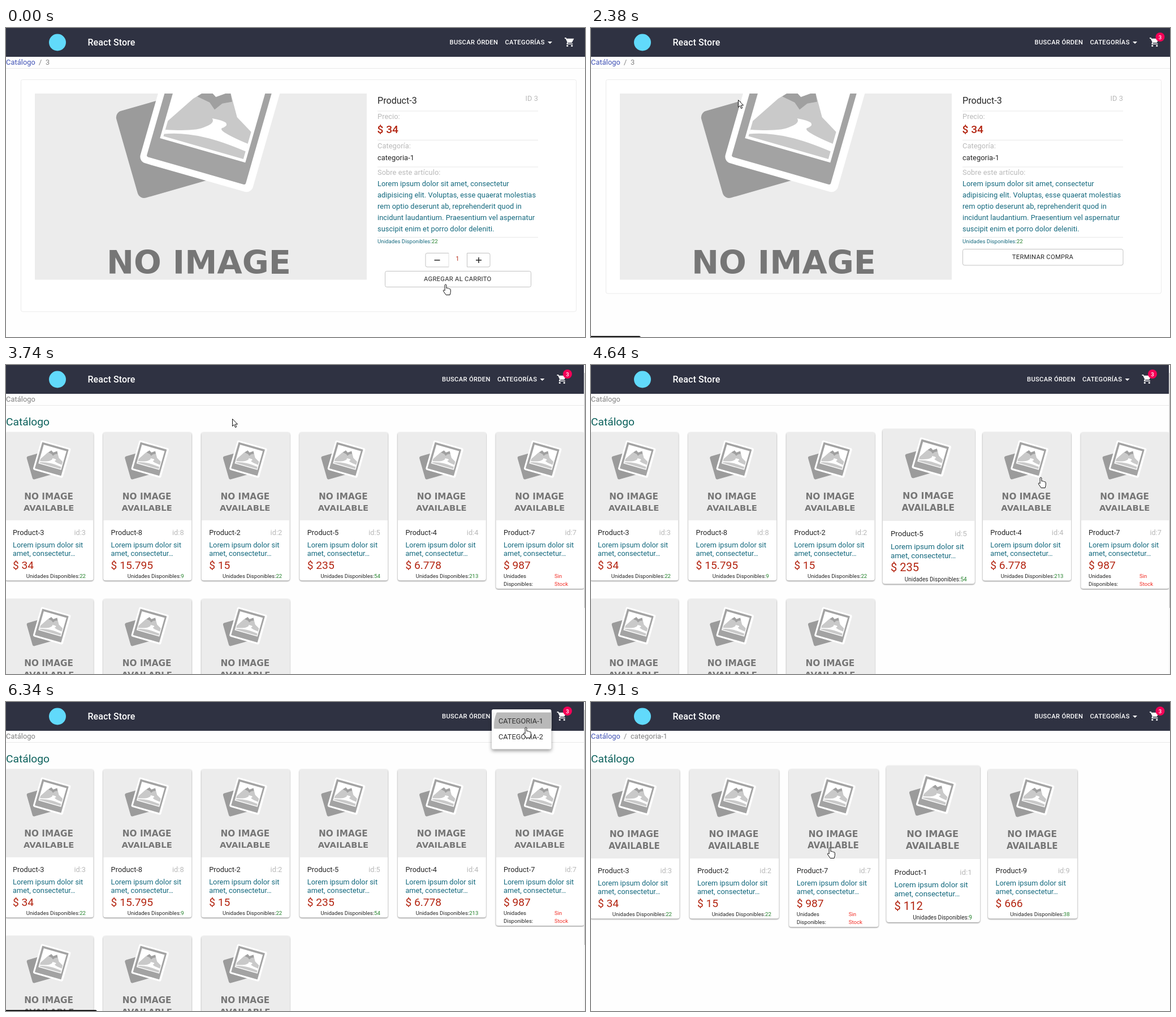
Write an HTML page that moves like this. It is 1024 px wide and 547 px high and loops after 8000 ms.

```html
<!DOCTYPE html>
<html lang="es">
<head>
<meta charset="utf-8">
<title>React Store</title>
<style>
html, body { margin: 0; width: 100%; height: 100%; overflow: hidden; background: #fefefe; }
svg { display: block; width: 1024px; height: 547px; font-family: Roboto, Arial, sans-serif; }
text { white-space: pre; }
.paper { fill: #fff; filter: drop-shadow(0 1px .8px rgba(0,0,0,.5)); }
.pop { fill: #fff; filter: drop-shadow(0 3px 3px rgba(0,0,0,.4)); }
.box { fill: none; stroke: #c2c2c2; }
.line { stroke: #e8e8e8; }
.bold { font-family: "DejaVu Sans", Verdana, sans-serif; font-weight: 700; text-anchor: middle; fill: #767676; }
</style>
</head>
<body>
<svg id="stage" viewBox="0 0 1024 547" xmlns="http://www.w3.org/2000/svg"></svg>
<script>
const stage = document.getElementById('stage');
const INK = '#262626', GRAY = '#b9b9b9', MUTED = '#808080', TEAL = '#14697e',
      RED = '#b32410', GREEN = '#22802a', LINK = '#3f51b5';

// Moments of the story, in ms.
const LOOP = 8000, ADDED = 1400, HOME = 2970, LOADED = 3740, MENU = 5300, FILTER = 6460, FILTERED = 6830;

// ---------- markup helpers ----------
const text = (x, y, size, fill, str, more = '') =>
  `<text x="${x}" y="${y}" font-size="${size}" fill="${fill}" ${more}>${str}</text>`;
const body = (x, y, fill, str, more = '') =>
  text(x, y, 12.8, fill, str, 'letter-spacing=".07" ' + more);
const rect = (x, y, w, h, more = '') =>
  `<rect x="${x}" y="${y}" width="${w}" height="${h}" ${more}/>`;
const hline = (x1, x2, y) => `<path class="line" d="M${x1} ${y}H${x2}"/>`;
const group = (id, inner) => `<g id="${id}">${inner}</g>`;
const button = (x, y, str, more = '') =>
  text(x, y, 11.2, INK, str, 'letter-spacing=".3" ' + more);
const END = 'text-anchor="end"', MID = 'text-anchor="middle"';

// ---------- placeholder picture, 587 units square ----------
const picture = `
<symbol id="pic" viewBox="0 0 587 587">
  <rect width="587" height="587" fill="#ececec"/>
  <rect width="142" height="160" rx="12" transform="translate(141 163) rotate(-16)" fill="#9b9b9b"/>
  <g transform="translate(240 52) rotate(16)">
    <rect width="207" height="205" rx="12" fill="#fff"/>
    <rect x="11" y="11" width="182" height="182" rx="3" fill="#a3a3a3"/>
    <rect x="25" y="25" width="157" height="130" fill="#fff"/>
    <path d="M30 150V122L62 72L84 48L100 58L122 42L146 82L177 100V150Z" fill="#c9c9c9"/>
    <path d="M68 66L84 48L100 58L122 42L130 58L114 66L104 80L92 70Z" fill="#a0a0a0"/>
    <path d="M104 96Q142 92 128 106Q112 114 178 122V136Q130 130 100 132Q60 134 30 146V138Q84 126 96 114Q112 102 104 96Z" fill="#fff"/>
  </g>
  <text class="bold" x="290" y="447.5" font-size="57.4">NO IMAGE</text>
  <text class="bold" x="290" y="522" font-size="55.6">AVAILABLE</text>
</symbol>`;
const pic = (x, y, size) => `<use href="#pic" x="${x}" y="${y}" width="${size}" height="${size}"/>`;

// ---------- catalogue ----------
const targets = [];   // clickable areas: x, y, w, h and the time they are on screen
const products = [[3, '34', 22], [8, '15.795', 9], [2, '15', 22], [5, '235', 54], [4, '6.778', 213],
  [7, '987', 0], [1, '112', 9], [9, '666', 38], [6, '78', 14]];

function card(x, y, w, [id, price, units], from, to) {
  const left = x + 13.5, right = x + w - 13.5, base = y + w;
  const h = w + (units ? 106.5 : 121), key = `card${targets.length}`;
  targets.push({ key, x, y, w, h, from, to });
  const soldOut = (a, b, dy) =>
    text(left, base + dy, 9.6, INK, a) + text(right - 39, base + dy, 9.6, '#f22c24', b);
  const stock = units
    ? text(right, base + 102, 9.6, INK, `Unidades Disponibles:<tspan fill="${GREEN}">${units}</tspan>`, END)
    : soldOut('Unidades', 'Sin', 102) + soldOut('Disponibles:', 'Stock', 116);
  return group(key,
    rect(x, y, w, h, 'rx="4" class="paper"') +
    `<g clip-path="inset(0 round 4px 4px 0 0)">${pic(x, y, w)}</g>` +
    text(left, base + 26, 12.8, INK, 'Product-' + id) +
    text(right, base + 26, 12.8, GRAY, 'id:' + id, END) +
    text(left, base + 47.5, 12.8, TEAL, 'Lorem ipsum dolor sit') +
    text(left, base + 63, 12.8, TEAL, 'amet, consectetur…') +
    text(left, base + 85.5, 19.2, RED, '$ ' + price) + stock);
}
const grid = (list, w, pitch, from, to) => list.map((p, i) =>
  card(-1.5 + pitch * (i % 6), 119 + 295 * Math.floor(i / 6), w, p, from, to)).join('');
const inCategory = [3, 2, 7, 1, 9].map(id => products.find(p => p[0] === id));
const heading = text(0, 107, 19.2, '#0c615c', 'Catálogo');

const bone = (x, y, w, h) => rect(x, y, w, h, 'rx="2.5" fill="#e2e2e2"');
const skeleton = Array.from({ length: 6 }, (_, i) => {
  const x = -1.5 + 175.9 * i;
  return rect(x, 119.5, 158.5, 275, 'rx="4" class="paper"') +
    bone(x, 119.5, 158.5, 20) + bone(x, 124, 158.5, 167) +
    bone(x + 7.2, 302, 71.5, 11.5) + bone(x + 7.2, 328, 115, 26) + bone(x + 7.2, 369, 21.5, 19);
}).join('');

// ---------- product page ----------
const about = ['Lorem ipsum dolor sit amet, consectetur', 'adipisicing elit. Voluptas, esse quaerat molestias',
  'rem optio deserunt ab, reprehenderit quod in', 'incidunt laudantium. Praesentium vel aspernatur',
  'suscipit enim et porro dolor deleniti.'];
const detail =
  rect(26.5, 91.5, 982, 410.5, 'id="frame" rx="3" fill="#fff" stroke="#ebebeb"') +
  `<svg x="51" y="116" width="587" height="329.5">${pic(0, -129, 587)}</svg>` +
  text(657, 134, 16, INK, 'Product-3', 'letter-spacing=".05"') + body(941, 129, GRAY, 'ID 3', END) +
  [147, 198.5, 246, 370.5].map(y => hline(657, 941, y)).join('') +
  body(657, 161, GRAY, 'Precio:') + text(656.5, 186, 19.2, RED, '$ 34', 'font-weight="500"') +
  body(657, 213, GRAY, 'Categoría:') + body(657, 234, INK, 'categoria-1') +
  body(657, 260, GRAY, 'Sobre este artículo:') +
  about.map((s, i) => body(657, 280 + 20 * i, TEAL, s)).join('') +
  text(657, 381, 9.6, TEAL, `Unidades Disponibles:<tspan fill="${GREEN}">22</tspan>`, 'letter-spacing=".06"') +
  group('buy',
    rect(742, 398.5, 114, 24.5, 'rx="3" class="box"') +
    rect(783, 397, 32.5, 28, 'fill="#fff"') +
    '<path d="M815.5 398.5V423" stroke="#c2c2c2"/><path d="M783 398.5V423" stroke="#e0e0e0"/>' +
    '<path d="M757.5 411H767.5M831 411H841M836 406V416" stroke="#222" stroke-width="1.5"/>' +
    text(798.5, 412, 10.4, RED, '1', 'id="count" ' + MID) +
    rect(670.5, 430.5, 258, 28, 'rx="3" class="box"') + button(798.8, 447.5, 'AGREGAR AL CARRITO', MID)) +
  group('finish', rect(657.5, 391.5, 283.5, 28.5, 'rx="3" class="box"') + button(799, 409.3, 'TERMINAR COMPRA', MID));

// ---------- frame around the pages ----------
const navText = (x, str) =>
  text(x, 29, 11.2, '#fff', str, 'font-weight="500" letter-spacing=".32"');
const cart = `<g transform="translate(987.2 15.5) scale(.8)" fill="#fff">
  <path d="M5 4H21.6L17 13H8.5Z"/><circle cx="7" cy="20" r="2"/><circle cx="17" cy="20" r="2"/>
  <path d="M1 3H3.6L8 12L6.4 15Q6 16 7 16H19" fill="none" stroke="#fff" stroke-width="2"/></g>`;
const nav = rect(0, 0, 1024, 51, 'fill="#2f3242"') +
  '<circle cx="91" cy="25.5" r="15" fill="#61dafb"/>' +
  text(144.5, 31, 16, '#fff', 'React Store', 'font-weight="500" letter-spacing=".1"') +
  group('menuBar', navText(784.5, 'BUSCAR ÓRDEN') + navText(882.5, 'CATEGORÍAS') +
    '<path d="M958 24H966L962 28Z" fill="#fff"/>' + cart +
    group('badge', '<circle r="8" fill="#f50057"/>' + text(0, 3.5, 9.6, '#fff', '3', 'font-weight="500" ' + MID)));
const crumbs = hline(0, 1024, 71.5) + body(0, 65, LINK, 'Catálogo', 'id="home"') +
  body(58, 65, MUTED, '/', 'id="slash"') + body(70, 65, MUTED, '', 'id="leaf"');
const scrollbar = rect(1022, 0, 2, 547, 'fill="#f4f4f4"') + rect(1022.8, 14, 1.2, 416, 'fill="#bdbdbd"');
const menu = rect(859, 13, 105.5, 70.5, 'rx="3" class="pop"') +
  '<clipPath id="item"><rect x="859" y="18.5" width="105.5" height="28.8"/></clipPath>' +
  rect(859, 18.5, 105.5, 28.8, 'fill="#f5f5f5"') +
  '<circle id="ripple" cx="921" cy="42" fill="#b9b9b9" clip-path="url(#item)"/>' +
  text(871, 37.6, 12.8, '#333', 'CATEGORIA-1') + text(871, 66.4, 12.8, '#333', 'CATEGORIA-2');
const cursors =
  '<path id="arrow" d="M0 0V12.8L3 10L5 15L7.2 14.1L5.1 9.3H9Z" fill="#fff" stroke="#111"/>' +
  '<path id="hand" d="M-1.4 1.5Q0 -1.5 1.4 1.5V7Q2.8 6 3.8 7.5Q5.2 6.7 6.2 8.2Q8.8 7.8 8.8 10V14L7.6 19H.6L-3.8 12.5Q-5 10.5 -3 10.3L-1.4 11.5Z" fill="#fff" stroke="#111"/>';

stage.innerHTML = `<defs>${picture}</defs>` + rect(0, 0, 1024, 547, 'fill="#fefefe"') + crumbs +
  group('detail', detail) + group('skeleton', heading + skeleton) +
  group('full', heading + grid(products, 156, 173.6, LOADED, FILTER)) +
  group('filtered', heading + grid(inCategory, 158, 175.9, FILTERED, LOOP)) +
  nav + group('scrollbar', scrollbar) + group('menu', menu) +
  '<path id="status"/>' + cursors;

// ---------- pointer ----------
// Stops of the pointer: time, x, y.
const stops = [[0, 777, 453], [240, 839, 441], [390, 836, 412], [840, 836, 403], [1110, 835, 446], [1690, 836, 440],
  [1840, 835, 396], [2110, 820, 392], [2380, 260, 127], [2660, 172, 74], [2810, 180, 19], [2970, 184, 24],
  [3210, 254, 73], [3590, 400, 95], [4160, 400, 95], [4400, 505, 185], [4610, 675, 196], [4640, 795, 198],
  [5020, 921, 42], [5150, 921, 19], [6340, 919, 44], [6830, 912, 60], [7340, 880, 110],
  [7640, 690, 250], [7885, 528, 260], [7910, 422, 257], [LOOP, 422, 257]];

const area = (x, y, w, h, from, to) => targets.push({ x, y, w, h, from, to });
area(742, 398, 114, 25, 0, ADDED);
area(670, 430, 258, 29, 0, ADDED);
area(657, 391, 284, 29, ADDED, HOME);
area(140, 0, 92, 51, 0, HOME);
area(869, 10, 83, 26, LOADED, MENU);
area(859, 13, 105, 70, MENU, FILTER);

function pointer(t) {
  const i = stops.findIndex(s => s[0] > t);
  const [t0, x0, y0] = stops[i - 1], [t1, x1, y1] = stops[i];
  const p = (t - t0) / (t1 - t0);
  return [x0 + (x1 - x0) * p, y0 + (y1 - y0) * p];
}
function over(a, t) {
  const [x, y] = pointer(t);
  return t >= a.from && t < a.to && x >= a.x && x < a.x + a.w && y >= a.y && y < a.y + a.h;
}

// Walk the pointer once to learn when it enters and leaves each card.
const hovers = [];
for (const a of targets.filter(a => a.key)) {
  let enter, leave;
  for (let t = a.from; t < a.to; t += 5) {
    if (!over(a, t)) continue;
    enter ??= t;
    leave = t;
  }
  if (enter !== undefined) hovers.push({ ...a, enter, leave });
}

// ---------- timeline ----------
const links = [[1840, 2660, 88], [HOME, LOADED, 69], [5430, 7210, 161]];   // from, to, status width
const $ = id => document.getElementById(id);
const within = (t, a, b) => t >= a && t < b;
const show = (id, on) => { $(id).style.display = on ? '' : 'none'; };
const move = (id, value) => $(id).setAttribute('transform', value);
const ease = (t, start, span) => {
  const p = Math.min(1, Math.max(0, (t - start) / span));
  return p * p * (3 - 2 * p);
};

function render(t) {
  const onDetail = t < HOME, onFull = within(t, LOADED, FILTER), onFiltered = t >= FILTERED;
  show('detail', onDetail);
  show('full', onFull);
  show('filtered', onFiltered);
  show('skeleton', !onDetail && !onFull && !onFiltered);
  show('scrollbar', onFull);
  move('menuBar', `translate(${onFull ? -13.5 : 0} 0)`);

  const added = t >= ADDED;
  show('buy', !added);
  show('finish', added);
  $('frame').setAttribute('height', added ? 378.5 : 410.5);
  $('count').textContent = t < 560 ? 1 : t < 840 ? 2 : 3;
  move('badge', `translate(1006.5 16) scale(${ease(t, ADDED - 70, 225)})`);

  const leaf = onDetail ? '3' : t >= FILTER ? 'categoria-1' : '';
  $('leaf').textContent = leaf;
  $('home').setAttribute('fill', leaf ? LINK : MUTED);
  show('slash', leaf);

  for (const { key, x, y, w, h, enter, leave } of hovers) {
    const s = 1 + .05 * Math.max(0, ease(t, enter, 260) - ease(t, leave, 260));
    const cx = x + w / 2, cy = y + h / 2;
    move(key, `translate(${cx} ${cy}) scale(${s}) translate(${-cx} ${-cy})`);
  }

  show('menu', within(t, MENU, FILTER + 130));
  $('menu').style.opacity = ease(t, MENU - 100, 250) - ease(t, FILTER - 60, 150);
  $('ripple').setAttribute('r', 58 * ease(t, 6160, 180) + 20 * ease(t, 6340, 150));

  const link = links.find(([a, b]) => within(t, a, b));
  $('status').setAttribute('d', link ? `M0 545.3H${link[2] - 2}L${link[2]} 547H0Z` : '');

  const hand = targets.some(a => over(a, t));
  const [x, y] = pointer(t).map(v => Math.round(v) + .5);
  show('hand', hand);
  show('arrow', !hand);
  move(hand ? 'hand' : 'arrow', `translate(${x} ${y})`);
}

function loop() {
  render(performance.now() % LOOP);
  requestAnimationFrame(loop);
}
loop();
</script>
</body>
</html>
```
